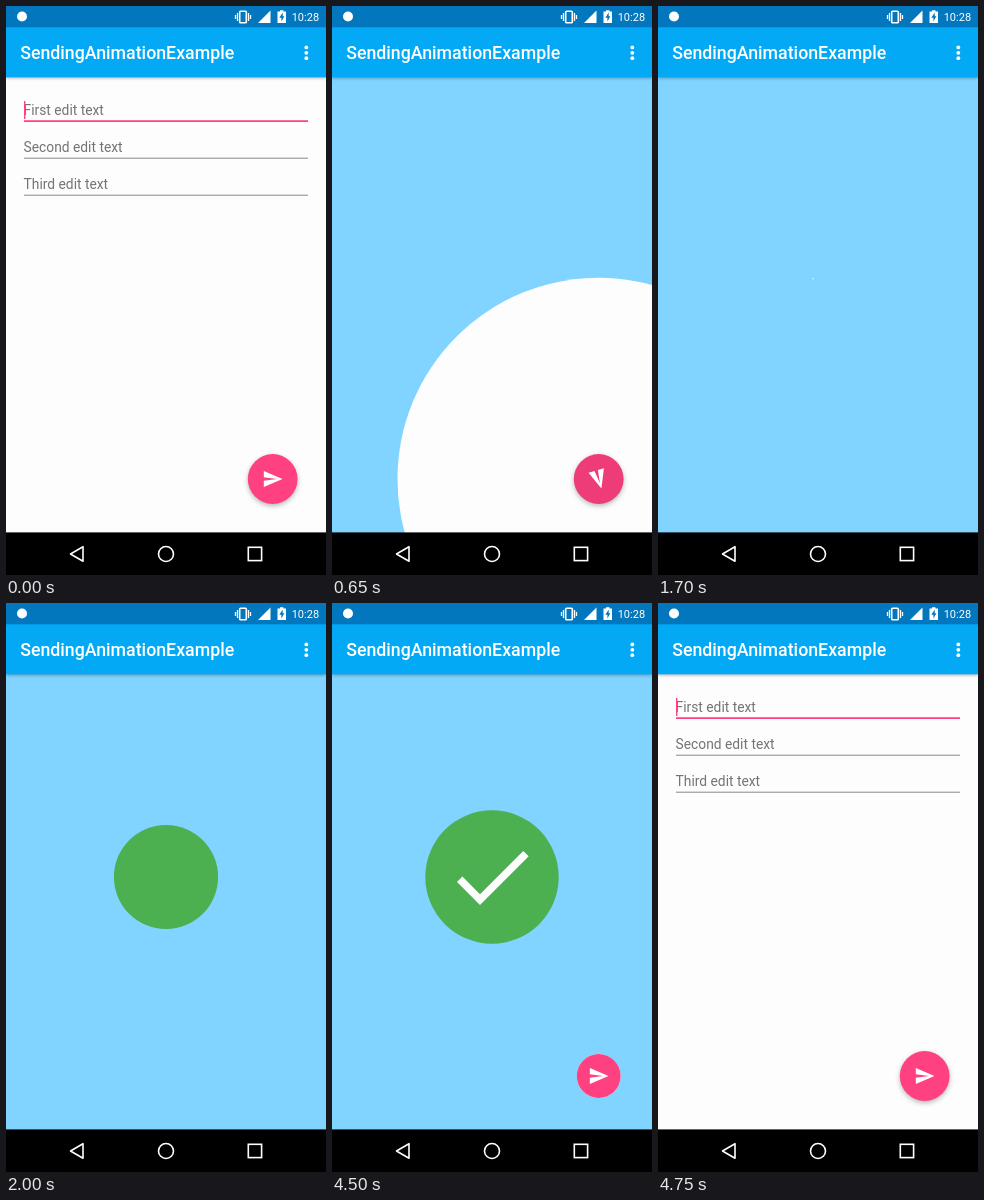
Recreate the animation shown at these times as an HTML page. Size 320 by 569 pixels, loop 4.8 s.

```html
<!DOCTYPE html>
<html lang="en">
<head>
<meta charset="utf-8">
<title>Sending animation</title>
<style>
html, body { margin: 0; width: 100%; height: 100%; overflow: hidden; background: #000; }
svg { display: block; width: 100%; height: 100%; font-family: Roboto, sans-serif; }
.bar { filter: drop-shadow(0 1px 1.5px rgba(0, 0, 0, .3)); }
#fab { filter: drop-shadow(0 2.5px 2.5px rgba(0, 0, 0, .28)); }
</style>
</head>
<body>
<svg viewBox="0 0 320 569">
  <defs><clipPath id="reveal"><circle id="hole" cx="266.7" cy="473" r="483"/></clipPath></defs>

  <rect width="320" height="569" fill="#80d4ff"/>
  <circle id="disc" cx="160" cy="274" fill="#4caf50"/>
  <path id="check" d="M127.7 276.3L148 296.6L194 250.6" pathLength="1" fill="none" stroke="#fff" stroke-width="7.6"/>

  <g clip-path="url(#reveal)">
    <rect y="71" width="320" height="456" fill="#fdfdfd"/>
    <g font-size="13.8" fill="#747474">
      <text x="17.6" y="109">First edit text</text>
      <text x="17.6" y="146">Second edit text</text>
      <text x="17.6" y="183">Third edit text</text>
    </g>
    <path d="M18 152.2H302M18 189.2H302" stroke="#888"/>
    <path d="M18 115.2H302" stroke="#ff4081" stroke-width="1.7"/>
    <rect id="cursor" x="18" y="95" width="1.4" height="18" fill="#ff4081"/>
    <circle id="fab" cx="266.7" cy="473" r="24.9"/>
  </g>
  <path id="plane" d="M-10 9L11 0L-10 -9V-2L5 0L-10 2Z" fill="#fff"/>

  <rect class="bar" y="21" width="320" height="50.3" fill="#03a9f4"/>
  <rect width="320" height="21.3" fill="#0277bd"/>
  <rect y="526.4" width="320" height="43" fill="#000"/>
  <g fill="#fff">
    <text x="14.2" y="53" font-size="17.75" font-weight="500">SendingAnimationExample</text>
    <text x="285.7" y="15" font-size="11">10:28</text>
    <circle cx="300.3" cy="41.4" r="1.9"/>
    <circle cx="300.3" cy="46.8" r="1.9"/>
    <circle cx="300.3" cy="52.2" r="1.9"/>
    <circle cx="16" cy="10.5" r="5"/>
    <path d="M252 17L264.500 4.500V17Z"/>
    <path d="M271.500 5.500H274V4.200H277.500V5.500H280V17H271.500Z"/>
  </g>
  <path d="M276.700 6.500L273.300 11.800H275.400V15.500L278.400 10.300H276.700Z" fill="#0277bd"/>
  <g fill="none" stroke="#fff" stroke-width="1.6">
    <rect x="233.700" y="5.300" width="6.600" height="11.400" rx=".8"/>
    <path d="M231.500 7V15M229.500 9V13M242.500 7V15M244.500 9V13" stroke-width="1.300"/>
    <path d="M64.500 548L77 540.700V555.300Z" stroke-linejoin="round"/>
    <circle cx="160" cy="548" r="7.500"/>
    <rect x="242.300" y="541.300" width="13.300" height="13.300"/>
  </g>
</svg>
<script>
const el = id => document.getElementById(id);
const hole = el('hole'), disc = el('disc'), check = el('check');
const cursor = el('cursor'), fab = el('fab'), plane = el('plane');

const LOOP = 4800, FLY = 835, LAND = 1763, BACK = 4460;
const FULL = 483, ICON = .889;
const routeX = [266.7, -30, 20, 160], routeY = [473, 473, 235, 274];

// Accelerate, then decelerate: 0 to 1 over dur ms
const ease = (t, start, dur) =>
  (1 - Math.cos(Math.PI * Math.min(1, Math.max(0, (t - start) / dur)))) / 2;

const point = ([a, b, c, d], u) => {
  const v = 1 - u;
  return v * v * v * a + 3 * v * v * u * b + 3 * v * u * u * c + u * u * u * d;
};
const slope = ([a, b, c, d], u) => {
  const v = 1 - u;
  return v * v * (b - a) + 2 * v * u * (c - b) + u * u * (d - c);
};
const show = (node, on) => node.setAttribute('visibility', on ? 'visible' : 'hidden');

function movePlane(t) {
  const flying = t >= FLY && t < LAND;
  const u = flying ? ease(t, FLY, LAND - FLY) : 0;
  const angle = flying
    ? Math.atan2(slope(routeY, u), slope(routeX, u)) * 180 / Math.PI
    : t < FLY ? 180 * ease(t, 505, 330) : 0;
  const size = ICON * Math.sqrt(1 - u);
  plane.setAttribute('transform',
    `translate(${point(routeX, u)} ${point(routeY, u)}) rotate(${angle}) scale(${size})`);
  show(plane, t < LAND || t > BACK + 20);
}

function draw(t) {
  hole.setAttribute('r', FULL * (1 - ease(t, 485, 300) + ease(t, BACK, 300)));
  show(cursor, t < 350 || t >= BACK);
  fab.setAttribute('fill', t >= 350 && t < BACK ? '#ee3c78' : '#ff4081');
  movePlane(t);

  disc.setAttribute('r', 66.7 * ease(t, LAND, 345));
  const drawn = ease(t, 2130, 310);
  check.setAttribute('stroke-dasharray', `${drawn} 2`);
  show(check, drawn > 0);
}

const start = performance.now();
function tick() {
  draw((performance.now() - start) % LOOP);
  requestAnimationFrame(tick);
}
tick();
</script>
</body>
</html>
```
